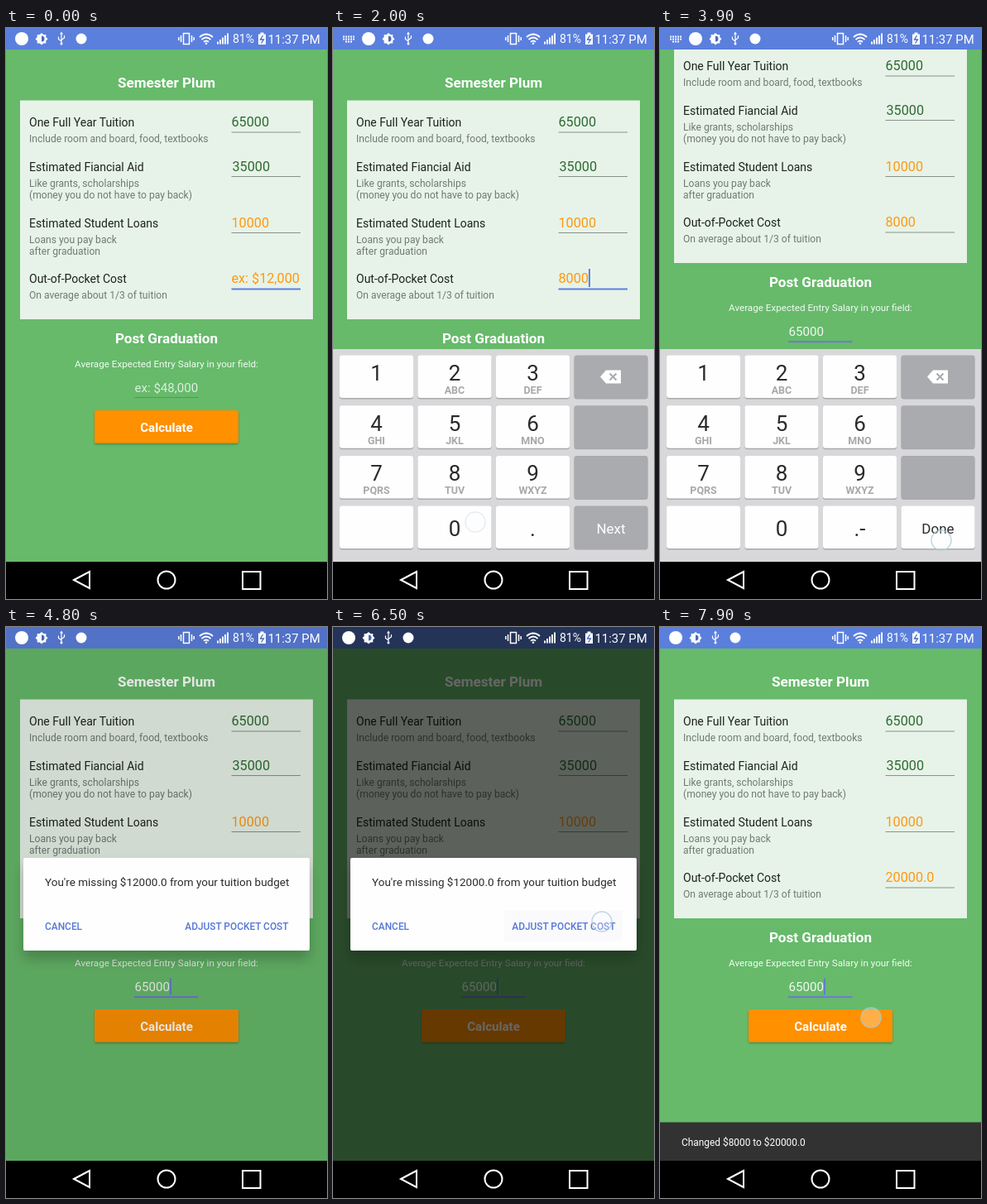
Recreate the animation shown at these times as an HTML page. Size 388 by 690 pixels, loop 8000 ms.

```html
<!DOCTYPE html>
<html lang="en">
<head>
<meta charset="utf-8">
<title>Tuition calculator</title>
<style>
  html, body { margin: 0; width: 100%; height: 100%; overflow: hidden; background: #000; }
  svg { display: block; width: 100vw; height: 100vh; }
  text { font-family: Roboto, sans-serif; white-space: pre; }
  .bold { font-weight: 700; fill: #fff; }
  .label { font-size: 14px; fill: #1c231d; }
  .note { font-size: 12.1px; fill: #707a72; }
  .value { font-size: 16.2px; }
  .action { font-size: 11.9px; font-weight: 500; fill: #5677d8; }
  .mid { text-anchor: middle; }
</style>
</head>
<body>
<svg viewBox="0 0 388 690">
  <defs>
    <filter id="lift" x="-20%" y="-40%" width="140%" height="200%">
      <feDropShadow dx="0" dy="1.5" stdDeviation="1" flood-opacity=".3"/>
    </filter>
    <filter id="float" x="-20%" y="-40%" width="140%" height="200%">
      <feDropShadow dx="0" dy="10" stdDeviation="8" flood-opacity=".22"/>
    </filter>
  </defs>

  <rect width="388" height="690" fill="#66ba6a"/>
  <g id="page">
    <text class="bold mid" x="194" y="72" font-size="17.1">Semester Plum</text>
    <rect x="17" y="87.5" width="354" height="264.5" fill="#e7f3e8"/>
    <g id="rows"></g>
    <rect id="costLine" x="272.5" width="83.5"/>
    <rect id="costCursor" y="291" width="2" height="22" fill="#5b80e0"/>
    <text class="bold mid" x="194" y="381" font-size="17.1">Post Graduation</text>
    <text class="mid" x="194" y="409.5" font-size="11.65" fill="#f2faf2">Average Expected Entry Salary in your field:</text>
    <text id="salary" x="155.5" y="440" font-size="15.1"/>
    <rect id="salaryLine" x="155" width="77.5"/>
    <rect id="salaryCursor" y="424.5" width="1.800" height="20" fill="#6079d2"/>
    <rect x="107" y="462" width="174" height="39.5" rx="2" fill="#ff9003" filter="url(#lift)"/>
    <text class="bold mid" x="194" y="487.5" font-size="15.1">Calculate</text>
  </g>

  <g id="keyboard">
    <rect y="388" width="388" height="257" fill="#d8d7d9"/>
    <g id="keys"></g>
    <path d="M323 421.5l7-8h18v16h-18z" fill="#fff"/>
    <path d="M334.500 417.500l8 8m0-8l-8 8" stroke="#a9abae" stroke-width="2"/>
  </g>

  <g id="snackbar">
    <rect y="598.500" width="388" height="47" fill="#323232"/>
    <text id="snackText" x="26" y="626.500" font-size="11.9" fill="#fff">Changed $8000 to $20000.0</text>
  </g>

  <rect width="388" height="26" fill="#5b7fdd"/>
  <rect id="dim" width="388" height="645"/>

  <g id="status" fill="none" stroke="#fff" stroke-width="1.500">
    <g id="keyboardIcon" stroke-width="2">
      <path d="M12 10.500h15M12 13.500h15M15 16.500h9" stroke-dasharray="2 1"/>
    </g>
    <g id="notices">
      <circle cx="19" cy="13" r="8" fill="#fff" stroke="none"/>
      <path d="M43 6l2.300 2h3v3l2.200 2.200-2.200 2.200v3h-3l-2.300 2-2.300-2h-3v-3l-2.200-2.200 2.200-2.200v-3h3z" fill="#fff" stroke="none"/>
      <path d="M43 9.500a3.500 3.500 0 0 1 0 7z" fill="#4a69b8" stroke="none"/>
      <path d="M67 6v13M67 16l-3.500-2.500v-3M67 14.500l3.500-2.500v-3" stroke-width="1.200"/>
      <path d="M65 7.500l2-3 2 3z" fill="#fff" stroke="none"/>
      <circle cx="67" cy="19" r="1.500" fill="#fff" stroke="none"/>
      <circle cx="91" cy="13" r="6.500" fill="#fff" stroke="none"/>
    </g>
    <path d="M214.500 6.500h7v13h-7zM211.500 9v8M224.500 9v8M208.800 11v4M227.200 11v4"/>
    <path d="M234 11q8-7 16 0M236.500 14q5.500-5 11 0M239 16.800q3-2.600 6 0" stroke-width="1.800"/>
    <circle cx="242" cy="18.800" r="1.300" fill="#fff" stroke="none"/>
    <path d="M256 19.500v-3M259 19.500v-5.500M262 19.500v-8M265 19.500v-10.500M268 19.500v-13" stroke-width="2"/>
    <path d="M305 7.500h2.500v-2h4v2h2.500v12.500h-9z" fill="#fff" stroke="none"/>
    <path d="M310.500 9l-3 5h4l-3 4.500" stroke="#4a69b8" stroke-width="1.300"/>
    <g fill="#fff" stroke="none">
      <text x="274" y="18.300" font-size="14">81%</text>
      <text x="316.500" y="18.500" font-size="14.900">11:37 PM</text>
    </g>
  </g>

  <g id="dialog">
    <rect x="21" y="279" width="346" height="112" rx="2" fill="#fefefe" filter="url(#float)"/>
    <rect id="pressed" x="207" y="343" width="143" height="36" rx="2" fill="#fafafc"/>
    <text x="47" y="313" font-size="13.500" fill="#2b2b2b">You're missing $12000.0 from your tuition budget</text>
    <text class="action" x="47" y="366">CANCEL</text>
    <text class="action" x="341.500" y="366" text-anchor="end">ADJUST POCKET COST</text>
  </g>

  <rect y="645" width="388" height="45"/>
  <g fill="none" stroke="#fff" stroke-width="2">
    <path d="M82 667l19-10v20z"/>
    <circle cx="194" cy="667" r="10.500"/>
    <path d="M286 657h21.500v21h-21.500z"/>
  </g>
  <circle id="touch" r="12" fill="#fff" fill-opacity=".28" stroke="#a9c9d8" stroke-opacity=".75" stroke-width="1.500"/>
</svg>

<script>
const LOOP = 8000;
const ui = {};
document.querySelectorAll('[id]').forEach(el => ui[el.id] = el);

const set = (el, attrs) => { for (const name in attrs) el.setAttribute(name, attrs[name]); };
const show = (el, on) => set(el, { opacity: +on });
const moveY = (el, y) => set(el, { transform: `translate(0 ${y})` });
const add = (parent, tag, attrs, content = '') => {
  const el = document.createElementNS('http://www.w3.org/2000/svg', tag);
  set(el, attrs);
  el.textContent = content;
  return parent.appendChild(el);
};

const GREEN = '#2e6b33', ORANGE = '#fd9913';
const rows = [
  ['One Full Year Tuition', ['Include room and board, food, textbooks'], '65000', GREEN, 119],
  ['Estimated Fiancial Aid', ['Like grants, scholarships', '(money you do not have to pay back)'], '35000', GREEN, 172.5],
  ['Estimated Student Loans', ['Loans you pay back', 'after graduation'], '10000', ORANGE, 240.5],
  ['Out-of-Pocket Cost', ['On average about 1/3 of tuition'], '', ORANGE, 308]
];
let cost;
rows.forEach(([label, notes, value, fill, y], i) => {
  add(ui.rows, 'text', { class: 'label', x: 28, y }, label);
  notes.forEach((note, n) => add(ui.rows, 'text', { class: 'note', x: 28, y: y + 19 + n * 14 }, note));
  cost = add(ui.rows, 'text', { class: 'value', x: i === 1 ? 273.5 : 272.5, y, fill }, value);
  if (i < 3) add(ui.rows, 'rect', { x: 272.5, y: y + 6.5, width: 83.5, height: 1, fill: '#89928a' });
});

const keyRows = ['1 2:ABC 3:DEF <', '4:GHI 5:JKL 6:MNO <', '7:PQRS 8:TUV 9:WXYZ <', '_ 0 . >'];
let pointKey, enterKey, enterText;
keyRows.forEach((row, r) => row.split(' ').forEach((key, c) => {
  const x = 8 + c * 94.5, y = 395.5 + r * 60.7, mid = x + 44.5;
  const [main, letters] = key.split(':');
  add(ui.keys, 'rect', { x, y: y + 1.5, width: 89, height: 51.5, rx: 3, fill: '#aaaaad' });
  const face = add(ui.keys, 'rect', { x, y, width: 89, height: 51.5, rx: 3, fill: c === 3 ? '#a9abae' : '#fefefe' });
  if (main === '>') {
    enterKey = face;
    enterText = add(ui.keys, 'text', { class: 'mid', x: mid, y: y + 33, 'font-size': 17 });
  } else if (/[\d.]/.test(main)) {
    const label = add(ui.keys, 'text', { class: 'mid', x: mid, y: y + (r === 3 ? 36 : 30.5), 'font-size': 26, fill: '#2a2a2a' }, main);
    if (main === '.') pointKey = label;
  }
  if (letters) add(ui.keys, 'text', { class: 'mid', x: mid, y: y + 46.5, 'font-size': 12.5, 'font-weight': 700, fill: '#a8a8ab' }, letters);
}));

// Piecewise linear value through [time, value] points.
function track(t, points) {
  const next = points.findIndex(p => p[0] > t);
  if (next === 0) return points[0][1];
  if (next < 0) return points[points.length - 1][1];
  const [t0, v0] = points[next - 1], [t1, v1] = points[next];
  return v0 + (v1 - v0) * (t - t0) / (t1 - t0);
}
const within = (t, a, b) => t >= a && t < b;
const typed = (t, text, times) => text.slice(0, times.filter(s => t >= s).length);

// start, end, x, y
const touches = [
  [900, 1100, 147, 541], [1350, 1450, 160, 602], [1600, 1700, 165, 600], [1820, 1930, 172, 597],
  [2200, 2370, 338, 606], [2750, 2870, 243, 480], [2980, 3070, 150, 481],
  [3160, 3210, 150, 605], [3270, 3310, 150, 605], [3360, 3420, 150, 605],
  [3680, 3920, 340, 619], [4400, 4570, 220, 482], [6380, 6540, 325, 356], [7780, 8000, 255, 472]
];

function draw(t) {
  const salaryFocus = t >= 2400;
  const keyboardOpen = within(t, 100, 4000);

  moveY(ui.page, track(t, [[2400, 0], [2600, -68], [4000, -68], [4080, 0]]));
  moveY(ui.keyboard, track(t, [[60, 257], [180, 90], [300, 0], [3980, 0], [4100, 150], [4230, 257]]));
  show(ui.keyboardIcon, keyboardOpen);
  set(ui.notices, { transform: `translate(${keyboardOpen ? 24 : 0} 0)` });

  const costText = t >= 6600 ? '20000.0' : typed(t, '8000', [1100, 1400, 1650, 1900]);
  cost.textContent = costText || 'ex: $12,000';
  set(ui.costLine, salaryFocus ? { y: 314.5, height: 1, fill: '#89928a' } : { y: 314.5, height: 2, fill: '#5b80e0' });
  set(ui.costCursor, { x: 272.5 + costText.length * 9.1 });
  show(ui.costCursor, within(t, 100, 600) || within(t, 1100, 2400));

  const salaryText = typed(t, '65000', [2850, 3050, 3200, 3300, 3400]);
  ui.salary.textContent = salaryText || 'ex: $48,000';
  set(ui.salary, { fill: salaryText ? '#f0f8f0' : '#dceedd' });
  set(ui.salaryLine, salaryFocus ? { y: 446, height: 2.2, fill: '#6e7fc4' } : { y: 446, height: 1, fill: '#5f8f64' });
  set(ui.salaryCursor, { x: 155.5 + salaryText.length * 8.5 });
  show(ui.salaryCursor, salaryFocus && !within(t, 3900, 4400) && !within(t, 5600, 6100) && !within(t, 7100, 7600));

  pointKey.textContent = salaryFocus ? '.-' : '.';
  enterText.textContent = salaryFocus ? 'Done' : 'Next';
  set(enterText, { fill: salaryFocus ? '#2a2a2a' : '#fff' });
  set(enterKey, { fill: salaryFocus ? '#fefefe' : '#a9abae' });

  set(ui.dim, { opacity: track(t, [[4750, 0], [4800, .1], [4900, .35], [5000, .54], [5100, .6], [6530, .6], [6600, .48], [6700, .23], [6800, .05], [6850, 0]]) });
  set(ui.dialog, { opacity: track(t, [[4650, 0], [4780, 1], [6550, 1], [6680, 0]]) });
  show(ui.pressed, within(t, 6450, 6700));
  moveY(ui.snackbar, track(t, [[6600, 47], [6700, 24.5], [6780, 6], [6860, 0]]));
  set(ui.snackText, { opacity: track(t, [[6720, 0], [6900, 1]]) });

  const touch = touches.find(([start, end]) => within(t, start, end + 120));
  show(ui.touch, false);
  if (touch) {
    const [start, end, cx, cy] = touch;
    set(ui.touch, { cx, cy, opacity: track(t, [[start, .4], [start + 60, 1], [Math.max(end, start + 61), 1], [end + 120, 0]]) });
  }
}

function frame(now) {
  draw(now % LOOP);
  requestAnimationFrame(frame);
}
draw(0);
requestAnimationFrame(frame);
</script>
</body>
</html>
```
